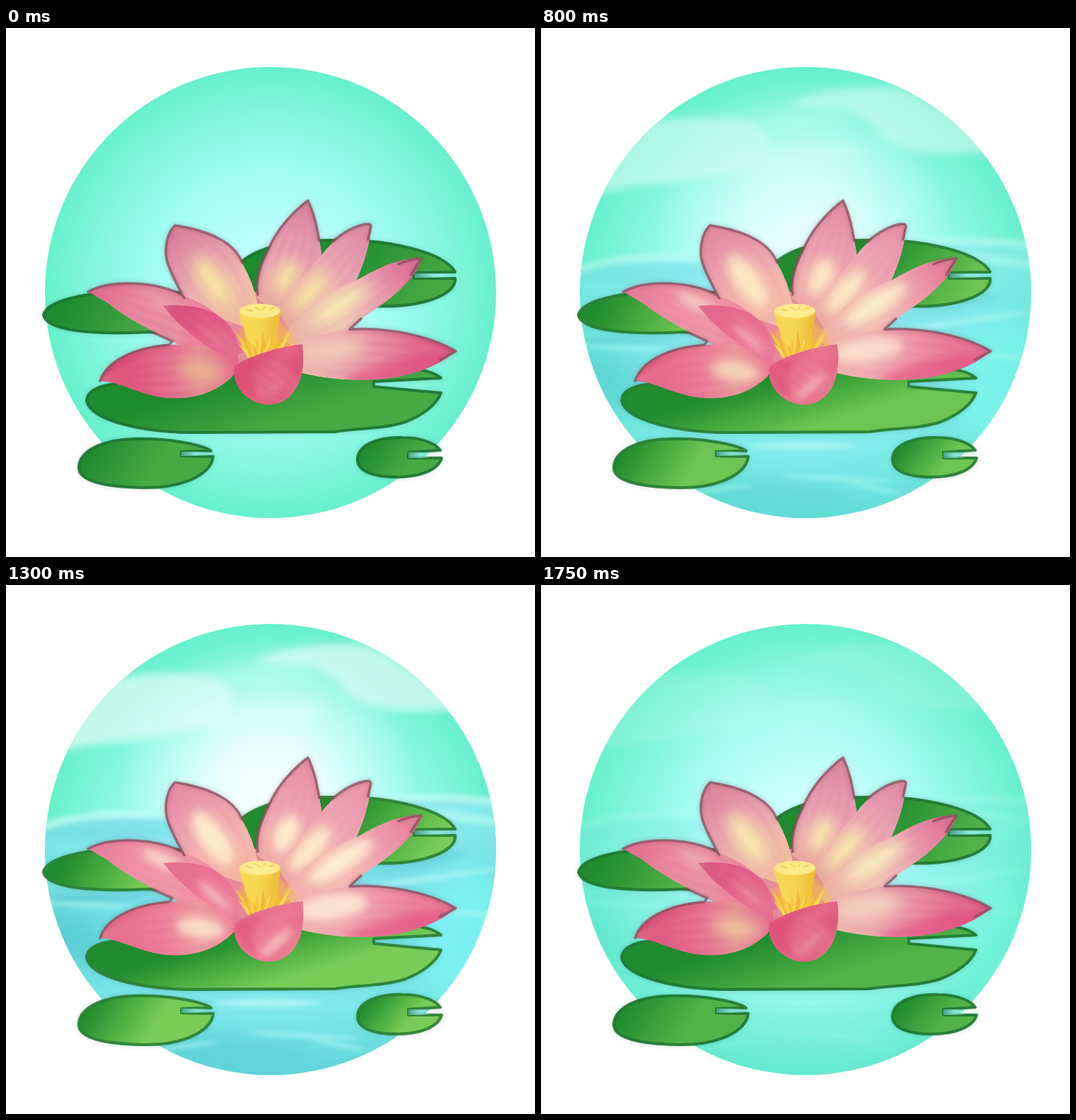
Write an HTML page that moves like this. It is 748 px wide and 748 px high and loops after 1.9 s.

```html
<!DOCTYPE html>
<html lang="en">
<head>
<meta charset="utf-8">
<title>Water lily</title>
<style>
  html, body { margin: 0; width: 100%; height: 100%; overflow: hidden; background: #fff; }
  svg { display: block; width: 100vw; height: 100vh; }
  .day { opacity: var(--day, 0); }
  .edge { fill: none; stroke-linejoin: round; stroke-linecap: round; }
</style>
</head>
<body>
<svg id="stage" viewBox="0 0 748 748"></svg>
<script>
const stage = document.getElementById('stage');
let defs = '', count = 0;

const blurs = [1, 3, 6, 10, 18];
for (const b of blurs)
  defs += `<filter id="blur${b}" x="-60%" y="-100%" width="220%" height="300%"><feGaussianBlur stdDeviation="${b}"/></filter>`;

const stops = list => list.map((s, i) => {
  const [color, alpha = 1] = s.split('/');
  return `<stop offset="${i / (list.length - 1)}" stop-color="${color}" stop-opacity="${alpha}"/>`;
}).join('');

function linear(x1, y1, x2, y2, ...colors) {
  const id = 'g' + count++;
  defs += `<linearGradient id="${id}" gradientUnits="userSpaceOnUse" x1="${x1}" y1="${y1}" x2="${x2}" y2="${y2}">${stops(colors)}</linearGradient>`;
  return `url(#${id})`;
}

function radial(cx, cy, r, ...colors) {
  const id = 'g' + count++;
  defs += `<radialGradient id="${id}" gradientUnits="userSpaceOnUse" cx="${cx}" cy="${cy}" r="${r}">${stops(colors)}</radialGradient>`;
  return `url(#${id})`;
}

function clip(d) {
  const id = 'c' + count++;
  defs += `<clipPath id="${id}"><path d="${d}"/></clipPath>`;
  return `clip-path="url(#${id})"`;
}

const path = (d, fill, more = '') => `<path d="${d}" fill="${fill}" ${more}/>`;
const line = (d, color, width, more = '') => `<path class="edge" d="${d}" stroke="${color}" stroke-width="${width}" ${more}/>`;
const soft = (d, fill, blur, alpha = 1) => path(d, fill, `filter="url(#blur${blur})" opacity="${alpha}"`);
const glow = (x, y, rx, ry, turn, color, blur, alpha = 1) =>
  `<ellipse rx="${rx}" ry="${ry}" transform="translate(${x} ${y}) rotate(${turn})" fill="${color}" filter="url(#blur${blur})" opacity="${alpha}"/>`;
const day = content => `<g class="day">${content}</g>`;

// Sky and water
const disc = 'M55,374a319,319 0 1 1 638,0a319,319 0 1 1 -638,0Z';
const sky = radial(374, 374, 319, '#c9ffff', '#bcfffe', '#a4fcf4', '#8af7e3', '#66f0cc');
const water = linear(0, 300, 0, 693, '#8ee9f1', '#7de1ec', '#67d5e2', '#7de4ee', '#60cfdf');
const horizon = 'M40,346C100,322 160,322 235,326C340,336 430,318 500,306C580,298 640,300 710,308';

function scene() {
  const clouds =
    soft('M70,160C130,125 200,124 270,126C315,130 330,152 318,172C300,205 220,215 150,222L70,236Z', '#e6fcf7', 6, .9) +
    soft('M348,106C390,90 440,80 500,83C545,92 590,135 650,168L640,176C570,182 510,178 475,148C480,136 455,132 438,118C410,112 380,115 348,106Z', '#e2fbf5', 6, .9) +
    glow(355, 185, 100, 15, -5, '#f2ffff', 10, .65) + glow(370, 128, 75, 12, -4, '#c2fff5', 10, .55);
  const shadows =
    glow(135, 441, 75, 7, -2, '#52b3cb', 6, .5) + glow(575, 394, 80, 12, -12, '#5cc5d8', 6, .55) +
    glow(145, 348, 95, 14, -2, '#68ccdb', 6, .45) + glow(80, 500, 55, 38, 12, '#45b9cc', 18, .55) +
    glow(300, 660, 130, 25, 3, '#4fc0d3', 10, .4) + glow(590, 630, 55, 10, 0, '#55bdd0', 6, .4);
  const ripples =
    [[115, 452, 65, 3, 2], [645, 328, 70, 7, 8], [605, 414, 95, 4, -8], [650, 464, 55, 3, 5],
     [370, 591, 75, 6, 0], [420, 637, 80, 3, 3], [250, 652, 50, 3, -6], [470, 650, 40, 3, 12]]
      .map(([x, y, rx, ry, turn]) => glow(x, y, rx, ry, turn, '#d0ffff', 3, .6)).join('');
  return path(disc, sky) + `<g ${clip(disc)}>` + day(
    path(disc, radial(370, 290, 215, '#fff', '#fff/.9', '#f4ffff/.45', '#e8ffff/0')) + clouds +
    path(horizon + 'L710,710L40,710Z', water, 'filter="url(#blur1)"') +
    glow(650, 500, 70, 90, 8, '#86fbff', 18, .75) + shadows + ripples +
    line(horizon, '#c3fbf6', 11, 'filter="url(#blur3)" opacity=".9"')
  ) + '</g>';
}

// Pads: outline, dark point, light point
function pad(d, x1, y1, x2, y2) {
  return line(d, '#24613c', 4, 'filter="url(#blur3)" opacity=".25"') +
    path(d, linear(x1, y1, x2, y2, '#1e8b2e', '#329a39', '#46aa42')) +
    day(path(d, linear(x1, y1, x2, y2, '#28922f/.4', '#5cbb45/.75', '#86d65c'))) +
    line(d, '#1b7530', 4, 'opacity=".9"') + day(line(d, '#45963f', 4, 'opacity=".5"'));
}
const notch = (x, y, w, h) => path(`M${x},${y}h${w}v${h}h${-w}Z`, linear(x, 0, x + w, 0, '#439f83', '#8ee9dc/.65', '#c8ffff/0'));

const pads =
  pad('M325,338C350,310 400,299 465,300C545,298 620,318 635,345L577,346L577,354L635,354C638,376 590,397 515,393L350,400Z', 480, 310, 600, 385) + notch(578, 347, 55, 6) +
  pad('M53,406C57,386 110,375 155,373L245,374L250,433L200,430C120,434 58,428 53,406Z', 85, 385, 190, 440) +
  pad('M114,527C115,507 145,502 190,500L420,484L575,482Q602,484 615,495L520,500L520,507L615,516C609,533 588,548 565,557C535,567 495,566 465,571L260,572C195,571 120,556 114,527Z', 300, 503, 325, 582) +
  pad('M103,620C105,596 140,582 180,581C230,579 280,590 290,598L248,599L248,605L293,606C290,632 248,651 195,650C140,649 101,641 103,620Z', 125, 585, 205, 635) + notch(248, 599, 40, 6) +
  pad('M497,610C497,590 525,578 560,579C590,579 609,589 614,597L569,600L569,608L616,608C611,625 586,635 552,635C520,635 497,627 497,610Z', 515, 585, 565, 625) + notch(569, 600, 32, 8);

// Petal: outline, base point, tip point, colours from base to tip, glow ellipse
function petal(d, [bx, by, tx, ty], colors, [x, y, rx, ry, turn], light = '#f5e6a4') {
  const dx = tx - bx, dy = ty - by, len = Math.hypot(dx, dy);
  let streaks = '';
  for (let i = -4; i <= 4; i++) {
    const px = -dy / len * i * 10, py = dx / len * i * 10;
    streaks += line(`M${bx + px / 3},${by + py / 3}Q${bx + dx * .55 + px * 1.3},${by + dy * .55 + py * 1.3} ${tx},${ty}`,
      i % 2 ? '#ffe0d6' : '#dc5f8c', 5, 'opacity=".13" filter="url(#blur3)"');
  }
  return `<g ${clip(d)}>` + path(d, linear(bx, by, tx, ty, ...colors)) + streaks +
    glow(x, y, rx, ry, turn, light, 10, .85) + glow(x, y, rx * .65, ry * .5, turn, light, 3, .4) +
    day(path(d, '#ffa9b4', 'opacity=".42"') + glow(x, y, rx * 1.05, ry, turn, '#fffae2', 6, .75)) + '</g>';
}

const petals =
  path('M235,443L300,385L340,372L410,378L487,427L425,488L322,490Z', '#e58a9a') +
  petal('M239,279C300,288 326,310 334,332Q350,360 356,390L345,425L270,400C250,380 240,360 230,337C221,314 228,289 239,279Z',
    [335, 410, 240, 280], ['#f1c3a0', '#efb8ae', '#e599ac', '#d87a98'], [292, 358, 42, 17, 55]) +
  petal('M427,244C437,265 442,290 447,322L420,375L385,405L355,382C353,355 360,335 371,313C382,286 405,260 427,244Z',
    [375, 400, 427, 244], ['#eab09f', '#ebaab2', '#e497ae', '#d97d9c'], [396, 352, 27, 15, -65]) +
  petal('M516,281C515,309 505,337 494,360L400,425L385,400C400,375 422,350 447,320C460,302 485,281 511,277Q516,277 516,281Z',
    [390, 410, 515, 279], ['#e8b09e', '#efbbb2', '#e79fb2', '#de86a6'], [430, 373, 38, 13, -48]) +
  petal('M587,328C583,345 565,364 546,380C524,398 503,408 486,426L420,460L390,440C410,405 450,372 495,357C525,339 555,326 583,325Q588,325 587,328Z',
    [405, 440, 587, 326], ['#ebb8a6', '#f0c7b5', '#e899ad', '#d9588a'], [473, 391, 50, 14, -33], '#f6ebb6') +
  petal('M636,457C600,435 540,423 488,426C450,430 420,440 400,452L418,488C465,500 525,501 565,491Q612,479 636,457Z',
    [410, 458, 636, 465], ['#ecbda8', '#ebacb0', '#e88ea4', '#e1648c', '#db5080'], [462, 455, 48, 17, -8], '#f2cbb6') +
  `<g ${clip('M420,488C465,500 525,501 565,491Q612,479 636,457L590,455Z')}>` + glow(555, 483, 75, 14, -13, '#e0487e', 6, .55) + '</g>' +
  petal('M116,373C150,354 215,359 250,378C295,393 325,425 335,460L300,460L235,443C200,425 165,407 144,389Z',
    [310, 440, 116, 368], ['#e86d92', '#ea8f9f', '#e8859d', '#de5a85'], [220, 389, 28, 9, 24], '#eda0a8') +
  petal('M133,499C142,471 180,452 222,448C275,445 314,450 330,470L323,490C299,516 262,527 225,523C188,519 160,500 133,499Z',
    [322, 482, 135, 495], ['#e56b8d', '#e59393', '#e36b8d', '#df527c', '#d5436c'], [275, 485, 33, 14, 8], '#ebb592') +
  petal('M222,393C262,389 300,397 319,425Q333,450 326,482C312,460 267,450 222,393Z',
    [320, 465, 222, 393], ['#e36a8d', '#e05682', '#d24474'], [294, 439, 28, 5, 42], '#ea839a');

// Petal contour where it meets sky or water
const contour = 'M116,373C150,354 215,359 250,378M252,382C245,369 237,355 230,337C221,314 228,289 239,279C300,288 326,310 334,332' +
  'M356,377C353,355 360,335 371,313C382,286 405,260 427,244C437,265 440,283 443,301M462,302C478,288 495,279 511,277Q516,277 516,281L512,299' +
  'M555,334Q570,327 587,326L573,349M502,411L486,426C540,423 600,435 636,457L614,469M207,430L235,443L231,448C180,452 142,471 133,499';
const outline =
  line(contour, '#713b4c', 4, 'filter="url(#blur3)" opacity=".3"') +
  line(contour, '#8d4b5c', 3.5, 'opacity=".75"');

function stamen() {
  let spikes = '';
  for (let i = 0; i < 19; i++) {
    const x = 324 + i * 4.9, y = 428 + (i * 7 % 4) * 5 + (i % 2) * 4;
    spikes += path(`M${x},${y}L${372 + (i - 9) * 2},466L${360 + (i - 9) * 2},468Z`, ['#f6c53c', '#fbd957', '#f0b83a'][i % 3]);
  }
  return soft('M330,432L345,415L390,418L407,435L395,455L345,469Z', '#f2b94a', 3, .7) +
    path('M329,402Q335,392 362,392Q388,393 389,402L383,432L388,450L345,464L338,430Z', linear(330, 0, 390, 0, '#f8d84f', '#f6d650', '#edb832')) +
    spikes + `<ellipse cx="359" cy="400" rx="29" ry="10" fill="#fbe987"/>` +
    line('M340,398l8,2m5,-5l7,4m6,-5l-2,4m9,0l6,-2', '#edce55', 2) +
    day(glow(357, 403, 24, 9, 0, '#fff9b4', 3, .25));
}

const front = petal('M419,447C383,451 345,463 323,478C318,508 343,532 372,533C401,532 427,505 419,447Z',
  [350, 480, 413, 525], ['#de5579', '#e46383', '#de5579', '#e47389'], [382, 506, 28, 6, -42], '#e98795') +
  soft('M323,478Q351,466 365,470Q340,490 354,523Q325,513 323,478Z', '#d9436f', 3, .35);

const picture = scene() + pads + petals + outline + stamen() + front;
stage.innerHTML = `<defs>${defs}</defs>${picture}`;

// Daylight rises and falls in hard steps of one fifth
const changes = [500, 650, 800, 950, 1100, 1300, 1450, 1600, 1750];
let shown = -1;
function tick() {
  const t = performance.now() % 1900;
  const step = changes.filter(c => t >= c).length;
  const level = Math.min(step, 10 - step) / 5;
  if (level !== shown) stage.style.setProperty('--day', shown = level);
  requestAnimationFrame(tick);
}
tick();
</script>
</body>
</html>
```
